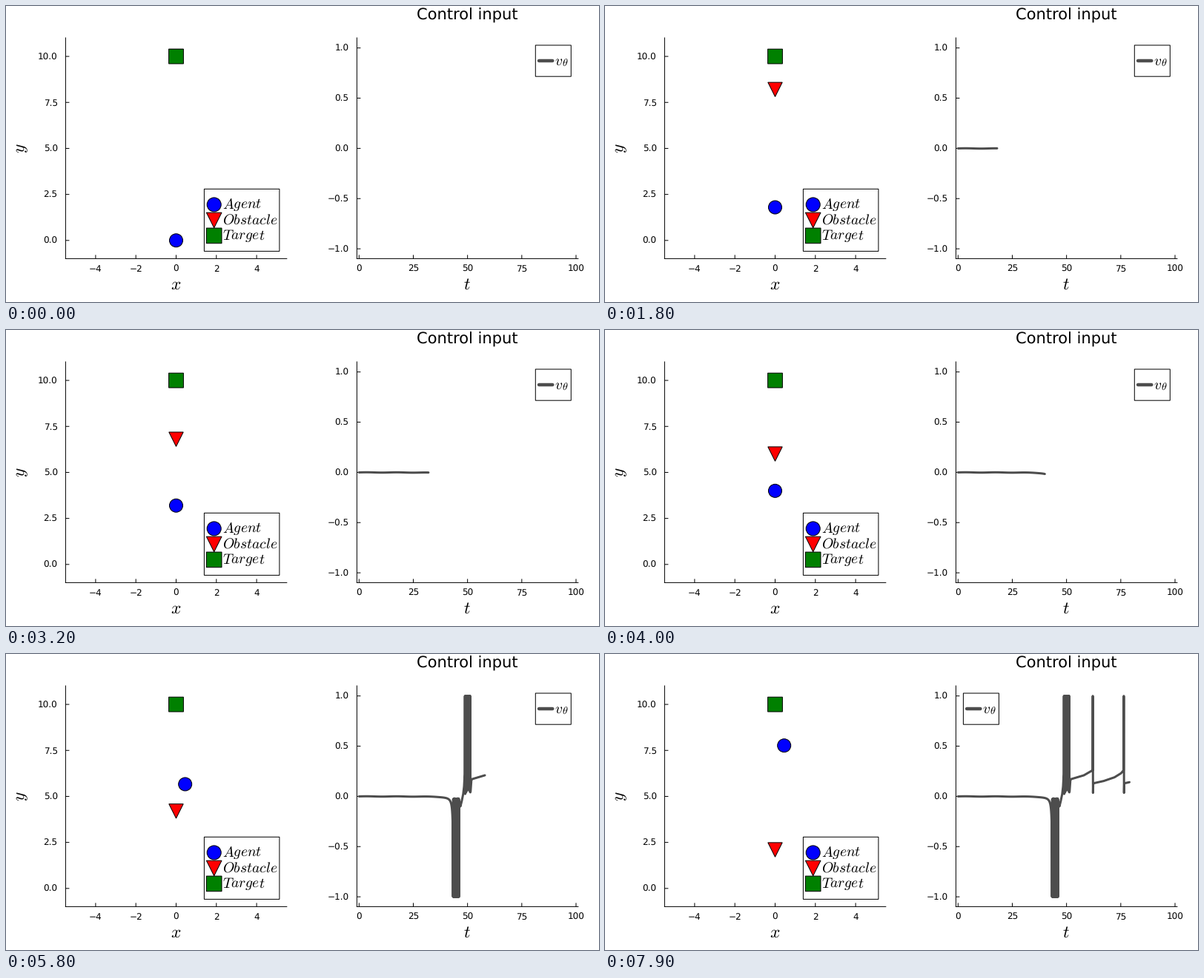
Animation of 800 by 400 pixels, one loop 8 s. Source, as a matplotlib script:

```python
import numpy as np
import matplotlib.pyplot as plt
from matplotlib.animation import FuncAnimation
from matplotlib.patches import Circle, Polygon, Rectangle

plt.rcParams.update({
    "font.family": "DejaVu Sans",
    "mathtext.fontset": "cm",
    "text.hinting": "none",
    "path.simplify": False,
    "path.snap": False,
})
PX = 0.72  # points per pixel at 100 dpi
FRAMES, INTERVAL = 80, 100
DT = 0.1
GRAY = "#4d4d4d"

fig = plt.figure(figsize=(8, 4), dpi=100, facecolor="white")
ax = fig.add_axes([0, 0, 1, 1])
ax.set(xlim=(0, 800), ylim=(400, 0))
ax.axis("off")


# Data to pixel coordinates
def left_x(x):
    return 229.5 + 27.15 * x


def left_y(y):
    return 316.8 - 24.87 * y


def right_x(t):
    return 476.3 + 2.927 * t


def right_y(v):
    return 192.4 - 135.7 * v


def segment(xs, ys, width=1, color="black", **kw):
    return ax.plot(xs, ys, color=color, lw=width * PX, **kw)[0]


def label(x, y, text, size, **kw):
    return ax.text(x, y, text, fontsize=size * PX, color="black", **kw)


def number(v, digits):
    return f"{v:.{digits}f}".replace("-", "\u2212")


def draw_axes(x0, x1, xticks, yticks, to_x, to_y):
    top, bottom = 43, 341.4
    segment([x0, x0], [top, bottom], solid_capstyle="projecting")
    segment([x0, x1], [bottom, bottom], solid_capstyle="projecting")
    for v in xticks:
        x = to_x(v)
        segment([x, x], [bottom, bottom - 5], solid_capstyle="butt")
        label(x, 359, number(v, 0), 12, ha="center", va="baseline")
    for v in yticks:
        y = to_y(v)
        segment([x0, x0 + 5], [y, y], solid_capstyle="butt")
        label(x0 - 10.7, y + 4.4, number(v, 1), 12, ha="right", va="baseline")


def frame_box(x, y, w, h):
    return ax.add_patch(Rectangle((x, y), w, h, fc="white", ec="black",
                                  lw=PX, zorder=5))


def disc(x, y, r, z):
    return ax.add_patch(Circle((x, y), r, fc="blue", ec="black", lw=PX, zorder=z))


def triangle_points(x, y, r):
    return [(x - r, y - r), (x + r, y - r), (x, y + r)]


def triangle(x, y, r, z):
    return ax.add_patch(Polygon(triangle_points(x, y, r), fc="red", ec="black",
                                lw=PX, joinstyle="miter", zorder=z))


def square(x, y, r, z):
    return ax.add_patch(Rectangle((x - r, y - r), 2 * r, 2 * r, fc="green",
                                  ec="black", lw=PX, zorder=z))


def control_legend(x):
    return [
        frame_box(x, 53, 48, 42.2),
        segment([x + 4.7, x + 23], [74, 74], 4.5, GRAY,
                solid_capstyle="round", zorder=6),
        label(x + 25.7, 79.3, "$v$", 19.6, va="baseline", zorder=6),
        label(x + 35.7, 82.3, r"$\theta$", 14.2, va="baseline", zorder=6),
    ]


def agent_path(t):
    """Integrate the heading (angle from vertical) at speed 0.1."""
    heading = np.interp(t, [43, 46.2, 48.3, 51.5, 58, 62.5, 79],
                        [0, 0.8, 0.8, 0.09, 0.04, 0.022, -0.039])
    mid = (heading[1:] + heading[:-1]) / 2
    step = 0.1 * DT
    x = np.concatenate([[0], np.cumsum(np.sin(mid) * step)])
    y = np.concatenate([[0], np.cumsum(np.cos(mid) * step)])
    return x, y


def control_input(t):
    """Steering rate: slow drift, two chattering bands, two lone spikes."""
    n = np.arange(len(t))
    v = np.interp(t, [46.2, 46.7, 47.3, 48, 48.4, 48.7, 51.4, 51.8, 58, 60, 62],
                  [-0.05, -0.1, -0.05, 0.024, 0.1, 0.22, 0.05, 0.17, 0.21, 0.235, 0.26])
    early = n < 433
    v[early] = (-0.09 * (43.6 - t[early]) ** -1.4
                + 0.0015 * np.sin(0.45 * t[early]))

    right = (n >= 433) & (n <= 461)
    v[right] = np.where(n[right] % 2, -1, -0.02 - 0.008 * np.sin(2 * t[right]) ** 2)
    left = (n >= 488) & (n <= 513)
    low = np.interp(t[left], [48.8, 50.2, 51.3], [0.02, 0.08, 0.04])
    v[left] = np.where(n[left] % 2, low, 1)

    for peak in (621, 764):
        after = n > peak
        v[after] = np.interp(t[after] - peak * DT, [0.2, 5, 10, 13, 14.2],
                             [0.13, 0.153, 0.19, 0.23, 0.26])
        v[peak], v[peak + 1] = 1, 0.035
    return v


time = np.arange((FRAMES - 1) * 10 + 1) * DT
path_x, path_y = agent_path(time)
curve_x, curve_y = right_x(time), right_y(control_input(time))

# Left plot
draw_axes(80.4, 378.8, range(-4, 5, 2), np.arange(0, 10.1, 2.5), left_x, left_y)
label(229, 376.5, "$x$", 23.5, ha="center", va="center")
label(21, 192.5, "$y$", 23.5, ha="center", va="center", rotation=90)

agent = disc(left_x(0), left_y(0), 9, 2)
obstacle = triangle(left_x(0), left_y(10), 9.7, 3)
square(left_x(0), left_y(10), 9.9, 4)

frame_box(267.4, 247.3, 101.5, 84.1)
rows = [(268.4, "Agent", disc, 9.5), (289.5, "Obstacle", triangle, 10.3),
        (310.4, "Target", square, 10.3)]
for y, name, marker, r in rows:
    marker(280.7, y, r, 6)
    label(292.5, y + 0.5, f"${name}$", 19.6, va="center", zorder=6)

# Right plot
draw_axes(473.4, 771.9, range(0, 101, 25), np.arange(-1, 1.1, 0.5), right_x, right_y)
label(622.5, 18.5, "Control input", 21, ha="center", va="baseline")
label(622, 376.5, "$t$", 23.5, ha="center", va="center")

curve = segment([], [], 3, GRAY, solid_capstyle="round",
                solid_joinstyle="round", zorder=3)
legend_right = control_legend(714.3)
legend_left = control_legend(483.4)


def update(k):
    i = 10 * k
    agent.center = left_x(path_x[i]), left_y(path_y[i])
    obstacle.set_xy(triangle_points(left_x(0), left_y(10 - 0.1 * k), 9.7))
    end = i + 1 if k else 0
    curve.set_data(curve_x[:end], curve_y[:end])
    # The legend jumps aside once the second spike comes near it
    moved = k >= 77
    for artist in legend_right:
        artist.set_visible(not moved)
    for artist in legend_left:
        artist.set_visible(moved)
    return [agent, obstacle, curve, *legend_right, *legend_left]


anim = FuncAnimation(fig, update, frames=FRAMES, interval=INTERVAL,
                     repeat=True, repeat_delay=0, blit=False)
plt.show()
```
